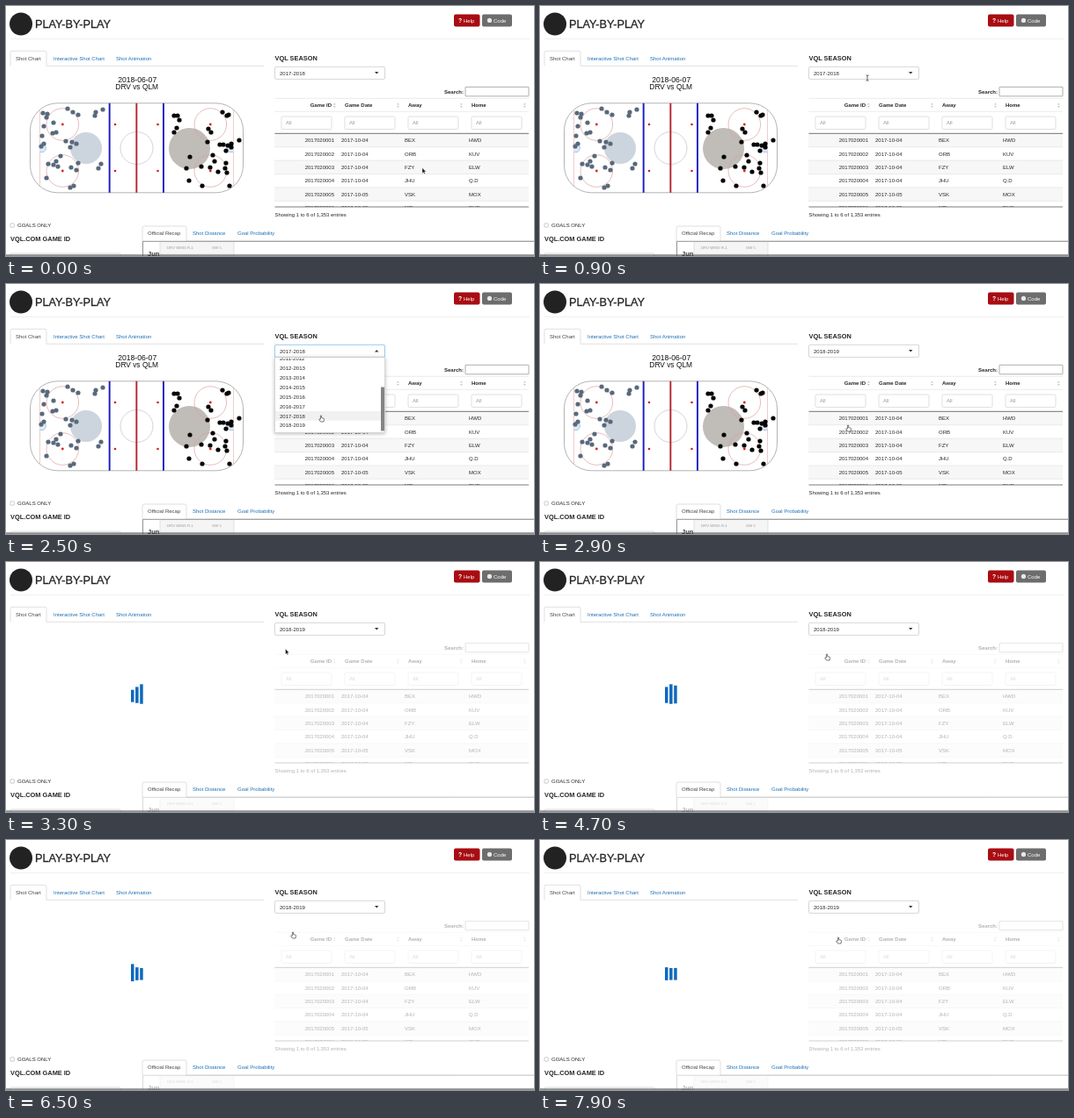
Recreate the animation shown at these times as an HTML page. Size 600 px wide and 285 px high, loop 8000 ms.

```html
<!DOCTYPE html>
<html lang="en">
<head>
<meta charset="utf-8">
<title>Play-by-play dashboard</title>
<style>
html, body { margin: 0; width: 100%; height: 100%; overflow: hidden; background: #fff; }
svg { display: block; width: 600px; height: 285px; font-family: "Liberation Sans", Arial, sans-serif; }
text { white-space: pre; }
</style>
</head>
<body>
<svg id="stage" viewBox="0 0 600 285"></svg>
<script>
const LOOP = 8000;
const INK = '#262626', LINK = '#1c6fb5', RULE = '#ddd';
const stage = document.getElementById('stage');

function el(parent, tag, attrs, content) {
  const node = document.createElementNS('http://www.w3.org/2000/svg', tag);
  for (const key in attrs) node.setAttribute(key, attrs[key]);
  if (content !== undefined) node.textContent = content;
  parent.appendChild(node);
  return node;
}
const group = (parent, attrs = {}) => el(parent, 'g', attrs);
const rect = (p, x, y, width, height, fill, more = {}) => el(p, 'rect', { x, y, width, height, fill, ...more });
const circle = (p, cx, cy, r, fill, more = {}) => el(p, 'circle', { cx, cy, r, fill, ...more });
const path = (p, d, stroke, width = 0.6, fill = 'none') => el(p, 'path', { d, stroke, 'stroke-width': width, fill });
const text = (p, x, y, size, content, fill = INK, more = {}) =>
  el(p, 'text', { x, y, 'font-size': size, fill, ...more }, content);
const box = (p, x, y, w, h, stroke = '#ccc', r = 1.5) =>
  rect(p, x, y, w, h, '#fff', { stroke, 'stroke-width': 0.6, rx: r });
const clip = (id, x, y, w, h) => rect(el(stage, 'clipPath', { id }), x, y, w, h, '#000');
const show = (node, on) => node.setAttribute('display', on ? 'inline' : 'none');
const BOLD = { 'font-weight': 700 };
const medium = color => ({ stroke: color, 'stroke-width': 0.3 });

clip('tableBody', 305, 145, 295, 84);
clip('optionList', 306, 84.5, 124, 84.7);

// Page header
circle(stage, 17, 20.5, 13, '#222');
text(stage, 33, 24.5, 12.7, 'PLAY-BY-PLAY', '#222', medium('#222'));
path(stage, 'M5 37.5H595', '#e4e4e4');
rect(stage, 509, 9.5, 29.5, 14, '#a80d12', { rx: 2 });
text(stage, 514, 18.7, 6.8, '?', '#fff', BOLD);
text(stage, 520, 18.6, 6, 'Help', '#fff');
rect(stage, 541, 9.5, 34, 14, '#6d6d6d', { rx: 2 });
circle(stage, 549.5, 16.4, 2.6, '#e8e8e8');
text(stage, 554, 18.6, 6, 'Code', '#fff');

// Tab bars: the first entry is the active tab
function tabs(x, y, activeWidth, end, height, entries) {
  const base = y + height, right = x + activeWidth;
  path(stage, `M${x} ${base}V${y + 2}q0-2 2-2H${right - 2}q2 0 2 2V${base}H${end}`, '#ccc');
  entries.forEach(([tx, label], i) => text(stage, tx, base - 6.7, 6, label, i ? LINK : '#444'));
}
tabs(5, 51.3, 41, 293, 17, [[11, 'Shot Chart'], [54, 'Interactive Shot Chart'], [125, 'Shot Animation']]);
tabs(155, 251, 50, 600, 17, [[161, 'Official Recap'], [212, 'Shot Distance'], [263, 'Goal Probability']]);

// Shot chart
const chart = group(stage);
const centered = { 'text-anchor': 'middle' };
text(chart, 149.2, 87, 8.6, '2018-06-07', '#111', centered);
text(chart, 148.7, 95.1, 8.4, 'DRV vs QLM', '#111', centered);
rect(chart, 27.5, 110.8, 242, 102, '#fff', { rx: 31, stroke: '#a0a0a0', 'stroke-width': 0.8 });
path(chart, 'M38.5 118V205.5M258.5 118V205.5', '#e6a9a9');
circle(chart, 148.5, 162, 18.5, 'none', { stroke: '#b4b8c6', 'stroke-width': 0.6 });
circle(chart, 91, 162, 18, '#aab9c9', { opacity: 0.6 });
circle(chart, 208.5, 162.5, 23.5, '#b5b1ab', { opacity: 0.85 });
for (const x of [64.3, 232.3]) for (const y of [135, 188]) {
  circle(chart, x, y, 18.3, 'none', { stroke: '#dfa0a0', 'stroke-width': 0.7 });
  circle(chart, x, y, 1.4, '#d22');
}
for (const x of [124, 172.5]) for (const y of [135, 188]) circle(chart, x, y, 1.3, '#c22');
path(chart, 'M38.5 157H43q5 5 0 9.5H38.5M258.5 157H254q-5 5 0 9.5H258.5', '#85a9d0', 0.6, '#dceaf6');
rect(chart, 116.7, 110.8, 1.9, 102, '#1a1ac0');
rect(chart, 178, 110.8, 1.9, 102, '#1a1ac0');
rect(chart, 147.4, 110.8, 1.9, 102, '#b3252b');
function shots(points, fill) {
  for (const point of points.split(' ')) {
    const [x, y] = point.split(',');
    circle(chart, x, y, 2.6, fill);
  }
}
shots('70,117 76,121 102,121 110,118 101,125 82,124 42,122 47,123 46,127 54,133 43,137 41,148 57,144 ' +
  '43,157 40,160 53,145 68,154 75,155 80,157 73,161 62,171 57,177 54,181 59,183 48,180 ' +
  '74,184 82,179 80,187 105,185 108,180 73,207 77,205 46,196', '#59697b');
shots('191,125 195,125 197,130 194,139 191,144 246,121 251,125 253,124 230,140 233,144 229,155 247,158 ' +
  '252,159 256,157 256,161 250,165 243,158 265,153 209,172 205,185 222,183 232,184 237,177 249,185 ' +
  '250,179 241,189 251,190 254,205 208,199 223,205 235,170', '#050505');

// Loading bars
const spinner = group(stage);
const bars = [142, 147.1, 152.2].map(x => rect(spinner, x, 146, 3.5, 13.6, '#0f69bd'));

// Lower left controls
rect(stage, 5, 247.8, 4.4, 4.4, '#fff', { stroke: '#aaa', 'stroke-width': 0.6, rx: 1 });
text(stage, 13, 252.1, 6, 'GOALS ONLY');
text(stage, 5, 267.6, 7.4, 'VQL.COM GAME ID', INK, BOLD);
box(stage, 5, 282, 125, 10);

// Recap panel
const recap = group(stage);
rect(recap, 175, 268.5, 84, 20, '#f5f5f5');
path(recap, 'M155.5 285V268.3H600', '#777', 0.8);
path(recap, 'M175 268.5V285M259 268.5V285', '#d0d0d0');
text(recap, 183, 277, 4.3, 'DRV WING R-1', '#999');
text(recap, 234, 277, 4.3, 'GW 5', '#999');
text(recap, 161, 285.3, 7.5, 'Jun', '#333', BOLD);

// Game table
const table = group(stage);
text(table, 498, 99.6, 6, 'Search:', INK, BOLD);
box(table, 522, 92.3, 72, 10.5, '#777', 0.5);
path(table, 'M305.5 105.3H594M305.5 120.3H594', RULE);
['Game ID', 'Game Date', 'Away', 'Home'].forEach((label, i) => {
  const x = 313 + i * 72;
  text(table, i ? x : 370, 115.2, 6, label, INK, { ...BOLD, 'text-anchor': i ? 'start' : 'end' });
  path(table, `M${x + 59} 112.6l1.4-2 1.4 2zM${x + 59} 114l1.4 2 1.4-2z`, 'none', 0, '#c4c4c4');
  box(table, x, 126, 57, 14.5);
  text(table, x + 5, 135.4, 6, 'All', '#999');
});
const body = group(table, { 'clip-path': 'url(#tableBody)' });
const games = ['BEX HWD', 'ORB KUV', 'FZY ELW', 'JHU Q.D', 'VSK MOX', 'NTL DUF'];
const GAME_ROW = 15.4;
games.forEach((teams, i) => {
  const y = 145.3 + i * GAME_ROW;
  const [away, home] = teams.split(' ');
  rect(body, 305, y, 289, GAME_ROW, i % 2 ? '#fff' : '#f7f7f7');
  path(body, `M305 ${y}H594`, RULE);
  text(body, 373, y + 9.8, 6, `201702000${i + 1}`, INK, { 'text-anchor': 'end' });
  text(body, 381, y + 9.8, 6, `2017-10-0${i < 4 ? 4 : 5}`);
  text(body, 453, y + 9.8, 6, away);
  text(body, 526, y + 9.8, 6, home);
});
path(table, 'M305.5 145.3H594M305.5 229H594', '#444', 0.7);
text(table, 305.5, 240.1, 5.9, 'Showing 1 to 6 of 1,353 entries');

// Season select
text(stage, 305.5, 61.8, 7.4, 'VQL SEASON', INK, BOLD);
const select = box(stage, 305.5, 69.3, 125, 14.1);
const season = text(stage, 311, 78.5, 6.05, '');
const caret = path(stage, '', 'none', 0, '#333');
const menu = group(stage, { style: 'filter: drop-shadow(0 1.5px 2px #0004)' });
rect(menu, 305.5, 83.6, 125, 86, '#fff', { stroke: '#ccc', 'stroke-width': 0.7 });
const list = group(menu, { 'clip-path': 'url(#optionList)' });
const options = group(list);
const ROW = 10.9, LIST_TOP = 88;
const highlight = rect(options, 306, 0, 124, ROW, '#f1f1f1');
for (let i = 0; i < 8; i++)
  text(options, 311, LIST_TOP + i * ROW + 7.6, 6.05, `${2011 + i}-${2012 + i}`);
const scrollbar = rect(menu, 426, 117.5, 4, 50, '#858585', { rx: 0.5 });

// Bottom window edge
rect(stage, 0, 282.8, 600, 0.9, '#bbb', { opacity: 0.6 });
rect(stage, 0, 283.7, 600, 0.8, '#222');

// Mouse pointers, each with its hot spot at 0,0
const pointer = group(stage);
const pointers = {
  arrow: path(pointer, 'M0 0V6.2L1.4 4.9 2.3 7 3.3 6.6 2.4 4.5H4.3Z', '#fff', 0.4, '#111'),
  beam: path(pointer, 'M-1.5-3.2Q0-3.2 0-2.2Q0-3.2 1.5-3.2M0-2.2V2.5M-1.5 3.3Q0 3.3 0 2.3Q0 3.3 1.5 3.3', '#222', 0.7),
  hand: path(pointer, 'M-.6.2Q0-.5.6.2V2.6L3 3.2Q3.7 3.5 3.5 4.4L3 7H-.5L-2.3 4.4Q-2.2 3.3-.6 4.2Z', '#222', 0.6, '#fff')
};

const track = [
  [0, 473, 184.5], [200, 473, 184.5], [900, 372, 82], [1300, 369.3, 83.5], [1850, 369.3, 83.5],
  [2250, 358, 150], [2600, 358, 150], [2800, 350, 161], [2950, 350, 161], [3250, 317.5, 99],
  [3350, 317.5, 99], [3600, 326, 105], [7400, 326, 105], [7850, 339, 111], [LOOP, 339, 111]
];
const clamp = v => Math.max(0, Math.min(1, v));
const smooth = v => v * v * (3 - 2 * v);
const ramp = (t, from, to) => smooth(clamp((t - from) / (to - from)));

function pointerAt(t) {
  const i = track.findIndex(key => key[0] > t);
  const [t0, x0, y0] = track[i - 1], [t1, x1, y1] = track[i];
  const k = ramp(t, t0, t1);
  return [x0 + (x1 - x0) * k, y0 + (y1 - y0) * k];
}

function pointerKind(t) {
  if (t < 850) return 'arrow';
  if (t < 1930) return 'beam';
  return t < 2950 || t >= 3450 ? 'hand' : 'arrow';
}

// Bars swell for the first 40% of a cycle, shrink until 80%, then rest.
function swell(phase) {
  const p = phase - Math.floor(phase);
  return p < 0.4 ? smooth(p / 0.4) : p < 0.8 ? smooth((0.8 - p) / 0.4) : 0;
}

function draw(t) {
  const open = t >= 1150 && t < 2900;
  const chosen = t >= 2900;
  const loading = t >= 3000;
  const [x, y] = pointerAt(t);
  const kind = pointerKind(t);

  season.textContent = chosen ? '2018-2019' : '2017-2018';
  select.setAttribute('stroke', open ? '#5aa5dc' : '#bbb');
  caret.setAttribute('d', open ? 'M419 77.6h4.4l-2.2-2.6z' : 'M419 75h4.4l-2.2 2.6z');
  show(menu, open);
  const scroll = 8.5 * ramp(t, 2150, 2350);
  options.setAttribute('transform', `translate(0 ${-scroll})`);
  const hovered = kind === 'hand' && y > 90
    ? Math.min(7, Math.floor((y + scroll - LIST_TOP) / ROW)) : 6;
  highlight.setAttribute('y', LIST_TOP + hovered * ROW);
  show(scrollbar, t >= 2150);

  show(chart, !loading);
  show(spinner, loading);
  const fade = 1 - 0.65 * ramp(t, 3100, 3250);
  table.setAttribute('opacity', fade);
  recap.setAttribute('opacity', fade);
  const cycle = 0.43 + (t - 3300) * 0.00203;
  bars.forEach((bar, i) => {
    const k = swell(cycle + 0.16 * (2 - i));
    bar.setAttribute('y', 146 - 6.8 * k);
    bar.setAttribute('height', 13.6 + 9 * k);
  });

  pointer.setAttribute('transform', `translate(${x} ${y})`);
  for (const name in pointers) show(pointers[name], name === kind);
}

const start = performance.now();
function tick() {
  draw((performance.now() - start) % LOOP);
  requestAnimationFrame(tick);
}
tick();
</script>
</body>
</html>
```
